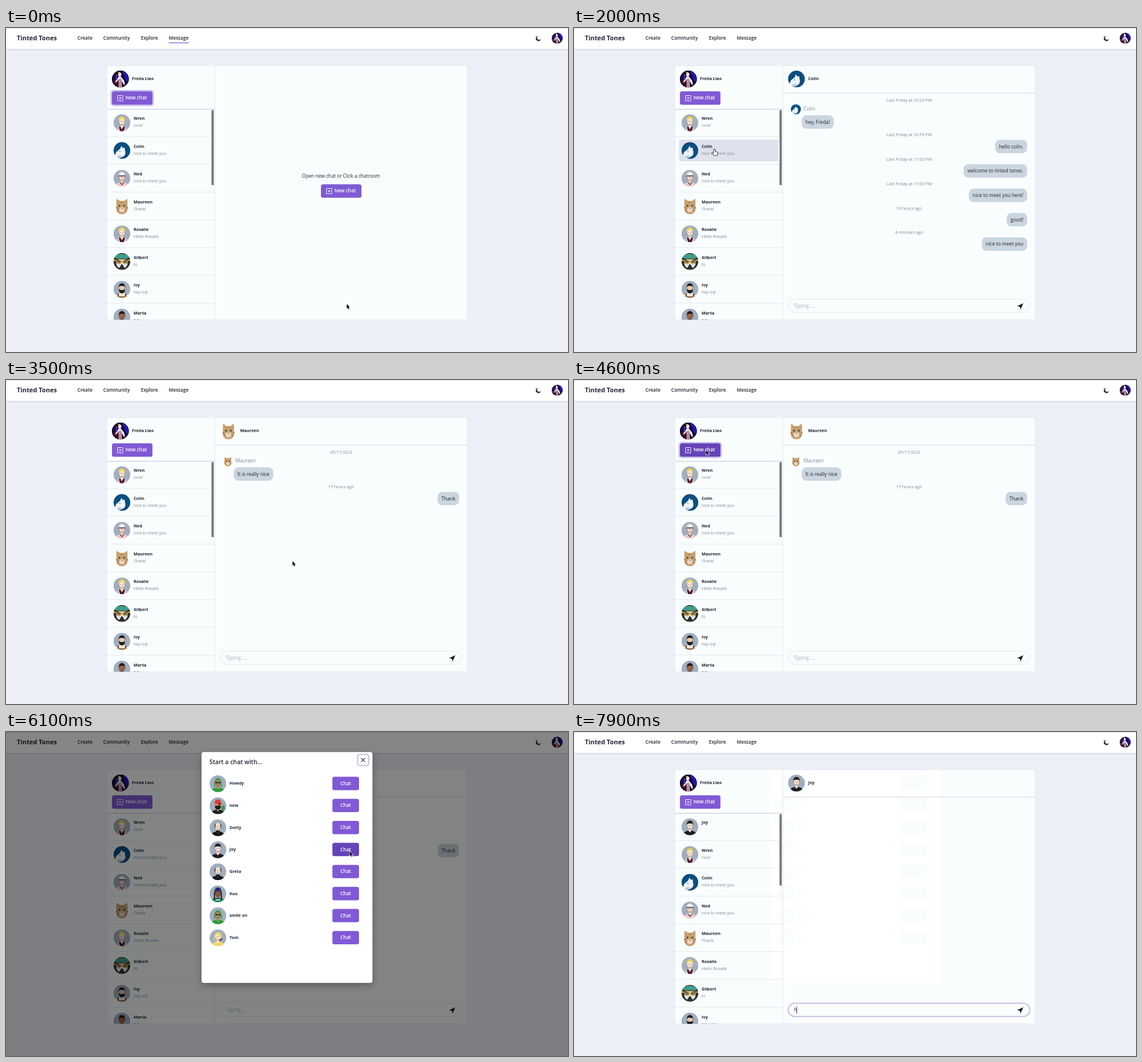
Recreate the animation shown at these times as an HTML page with a canvas. Size 960 by 554 pixels, loop 8000 ms.

```html
<!DOCTYPE html>
<html lang="en">
<head>
<meta charset="utf-8">
<title>Chat rooms</title>
<style>
  html, body { margin: 0; width: 100%; height: 100%; overflow: hidden; background: #edf2f7; }
  canvas { display: block; }
</style>
</head>
<body>
<canvas id="stage" width="960" height="554"></canvas>
<script>
const c = document.getElementById('stage').getContext('2d');
const LOOP = 8000, ROW = 47.45, MODAL_ROW = 37.65;
const INK = '#1f2633', MUTED = '#7b879b', LINE = '#e2e8ef', SURFACE = '#f9fdfd';
const PURPLE = '#805ad5', DEEP = '#6643b8', RING = '#cbbdec', SLATE = '#a0aec0', BUBBLE = '#cbd5e0';

// ---- avatars: lists of [fill, path] in a disc of radius 14.4 ----
const oval = (x, y, rx, ry = rx) =>
  `M${x - rx} ${y}a${rx} ${ry} 0 1 0 ${2 * rx} 0a${rx} ${ry} 0 1 0 ${-2 * rx} 0z`;
const disc = oval(0, 0, 14.4);
const shades = 'M-4.5-3h4v2.4h-3.4zM.5-3h4l-.6 2.4H.5z';
const person = (skin, top, hair, hairPath, ...extra) => [
  [SLATE, disc],
  [top, 'M-11.5 15C-11 8-6.5 7.5 0 6C6.5 7.5 11 8 11.5 15z'],
  [skin, 'M-2.4 2h4.8v5l-2.4 2.8-2.4-2.8z'],
  ['#3a3336', oval(0, -2.2, 5.3, 6.9)],
  [skin, oval(0, -2.2, 5, 6.6)],
  [hair, hairPath],
  ['#2a2426', oval(-1.9, -2, .5) + oval(1.9, -2, .5) + 'M-1.3 1.9h2.6v.5h-2.6z'],
  ...extra
];
const cropped = 'M-5.4-2C-6.8-13 6.8-13 5.4-2L4.3-5.5h-8.6z';
const hood = person('#c08a5e', '#2f9e3c', '#2f9e3c',
  'M-6.5 7C-9-15 9-15 6.5 7L4.4 2V-5.5h-8.8V2z', ['#222', shades]);
const bald = person('#f0dcc6', '#16161a', '#2b2b2e',
  'M-5.6 0v-5l1.6-2-.5 7zM5.6 0v-5l-1.6-2 .5 7z', ['#16161a', 'M-3 4.8h6v4h-6z']);

const faces = {
  me: [
    ['#170a2c', disc], ['#2415b8', 'M3-15h12V8L9 2z'], ['#3a1030', 'M-14 3l9-6 2 18h-9z'],
    ['#eee6f0', oval(-1, -7.5, 2.8, 3.6) + 'M-3-4h4l5 6 2 7-2 1-4-7v3h-5V1l-4 5-2-1z'],
    ['#b98a9e', 'M-3 0h5l1 15h-6z'], ['#e8d44a', oval(-2, -10.5, 1.6)], ['#3a2bd0', 'M-8-8h3v9h-3z']
  ],
  blond: person('#f8e0cc', '#f1eef0', '#ecd351',
    'M-5.6-2C-8-14 8-14 5.6-2L4.2-6-3-7.5z',
    ['#5a1d33', 'M-5.5 8L-3 6 0 11l3-5 2.5 2L3 15h-6z'],
    [SLATE, 'M-12 15l4.5-8 2.8 8zM12 15l-4.5-8-2.8 8z']),
  dog: [
    ['#0b4f80', disc],
    ['#eef3f7', 'M-12 6C-9 1-5-1-3-3L-1-8 2-4 5-5 5-1C7 4 6 9 1 11L-6 14-12 10z'],
    ['#bcc9d6', 'M-5 8l6 1-6 5-4-2z'], ['#26303a', oval(-11, 5.6, .9) + oval(-3.4, 1.6, .8)]
  ],
  cap: person('#f7d3bd', '#f6c9c4', '#f5f3f2',
    'M-5.6-4C-6.2-13 6.2-13 5.6-4z',
    ['#403946', 'M-6-5h12v1.5H-6z'], ['#2f3a5a', 'M-3 6.6L0 10l3-3.4.8 1L0 12l-3.8-4.4z']),
  cat: [
    ['#c9a071', 'M-9.5 0L-9.5-13-3.5-8.5h7l6-4.5L9.5 0C11.5 9 6 14.4 0 14.4S-11.5 9-9.5 0z'],
    ['#8e6842', 'M-2-8h1l.4 5zM1-8h1l-1.4 5zM-10 2l4 1-4 1zM10 2L6 3l4 1zM-8 7l3 0-2 2zM8 7L5 7l2 2z'],
    ['#eadbc6', oval(0, 6.5, 4.6, 4)], ['#3c4a38', oval(-4.2, -.5, 1.6) + oval(4.2, -.5, 1.6)],
    ['#9c5c4c', 'M-1.5 4h3L0 5.8z']
  ],
  cool: [
    ['#2d3030', disc], ['#3f9c8c', 'M-13-7C-9-15 9-15 13-7L9-5H-9z'],
    ['#e4e2dc', oval(0, 4, 9.5, 8)], ['#2d3030', 'M-1 5h2l4 7H-5z'],
    ['#e0b73a', oval(-5, 0, 5, 4.3) + oval(5, 0, 5, 4.3) + 'M-14-3h28v2h-28z'],
    ['#756d63', oval(-5, .2, 3.4, 2.8) + oval(5, .2, 3.4, 2.8)]
  ],
  beard: person('#f0cdb0', '#f1efec', '#1d1b1c',
    cropped + 'M-5.2-1L-3 1.2h6l2.2-2.2C6 9.5-6 9.5-5.2-1z',
    ['#8a5a34', 'M-8 15V8l3-1v5h10V7l3 1v7z']),
  dark: person('#9a6545', '#3b4453', '#201b1b', cropped),
  beanie: person('#f5dcc9', '#1c1d24', '#24211f', 'M-5.6-3C-6.8-13 6.8-13 5.6-3L4.2-5.4h-8.4z'),
  hood, bald,
  pirate: person('#e3a070', '#23222a', '#d6402f',
    'M-5.7-4C-6.2-13 6.2-13 5.7-4l3 2-3 0z',
    ['#1f1a1a', 'M-5 0h10C6 9-6 9-5 0zM.6-3.4h3v2.6h-3z'], ['#3d9a48', oval(9, 4, 3, 4.5)]),
  braids: person('#8c5b41', '#12885c', '#22306f',
    'M-5.8-4C-6.2-13 6.2-13 5.8-4z',
    ['#241c1c', 'M-6.5-4h2l-.5 14h-2zM6.5-4h-2l.5 14h2z'], ['#e8e8e8', 'M-4 10h8v1.4h-8z']),
  yellow: person('#f7e3c8', '#ecd869', '#f0d648',
    'M-6 9C-10-15 9-16 6.5 5L4.3-4-2-7-4.4-3z', ['#3a3a40', 'M2 4l5-3 1 1.4L3.4 6z'])
};

function avatar(face, x, y, r = 14.4) {
  c.save();
  c.translate(x, y);
  c.scale(r / 14.4, r / 14.4);
  c.clip(new Path2D(disc));
  for (const [fill, d] of faces[face]) { c.fillStyle = fill; c.fill(new Path2D(d)); }
  c.restore();
}

// ---- content ----
const contacts = [
  ['Wren', 'nice!', 'blond'], ['Colin', 'nice to meet you', 'dog'], ['Ned', 'nice to meet you', 'cap'],
  ['Maureen', 'Thank', 'cat'], ['Rosalie', 'Hello Rosalie', 'blond'], ['Gilbert', 'hi', 'cool'],
  ['Ivy', 'hey ivy!', 'beard'], ['Marta', 'hey', 'dark']
];
const people = [
  ['Howdy', 'hood'], ['new', 'pirate'], ['Dotty', 'bald'], ['Joy', 'beanie'],
  ['Greta', 'bald'], ['Kuo', 'braids'], ['smile on', 'hood'], ['Tom', 'yellow']
];
const chats = {
  colin: {
    name: 'Colin', face: 'dog', date: 'Last Friday at 10:20 PM', first: 'hey, Freda!',
    replies: [['Last Friday at 10:59 PM', 'hello colin.'], ['Last Friday at 11:00 PM', 'welcome to tinted tones.'],
      ['Last Friday at 11:00 PM', 'nice to meet you here!'], ['16 hours ago', 'good!'],
      ['8 minutes ago', 'nice to meet you']]
  },
  maureen: {
    name: 'Maureen', face: 'cat', date: '05/17/2022', first: 'It is really nice',
    replies: [['15 hours ago', 'Thank']]
  },
  joy: { name: 'Joy', face: 'beanie', replies: [] }
};

// ---- pointer: [time, x, y] ----
const track = [
  [0, 582, 472], [150, 582, 472], [850, 240, 122], [1100, 222, 92], [1250, 226, 108], [1400, 244.5, 134],
  [1750, 240, 208], [2100, 240, 208], [2320, 244, 302], [2400, 244, 298], [2500, 243, 250],
  [2750, 243, 302], [3150, 246, 304], [3550, 500, 310], [3950, 420, 210], [4400, 226, 120],
  [4600, 225.5, 120], [4800, 229, 117.5], [5000, 232, 118], [5800, 582, 203], [6100, 587, 204],
  [6700, 587, 204], [7050, 432, 116], [7400, 480, 425], [7550, 470, 475], [8000, 470, 475]
];
const ease = k => k * k * (3 - 2 * k);
const ramp = (t, a, b) => ease(t <= a ? 0 : t >= b ? 1 : (t - a) / (b - a));
function pointer(t) {
  const i = track.findIndex(k => k[0] > t);
  if (i < 1) return track[0].slice(1);
  const [a, ax, ay] = track[i - 1], [b, bx, by] = track[i], k = ramp(t, a, b);
  return [ax + (bx - ax) * k, ay + (by - ay) * k];
}
const inside = ([px, py], x, y, w, h) => px >= x && px < x + w && py >= y && py < y + h;

// ---- drawing helpers ----
function text(s, x, y, { size = 7.2, color = INK, weight = 400, align = 'left', family = '"Open Sans"' } = {}) {
  c.font = `${weight} ${size}px ${family}, sans-serif`;
  c.fillStyle = color;
  c.textAlign = align;
  c.fillText(s, x, y + size * .34);
}
function box(x, y, w, h, fill, r = 0, stroke, width = 1) {
  c.beginPath();
  c.roundRect(x, y, w, h, r);
  if (fill) { c.fillStyle = fill; c.fill(); }
  if (stroke) { c.strokeStyle = stroke; c.lineWidth = width; c.stroke(); }
}
function lines(d, color, width = 1) {
  c.strokeStyle = color;
  c.lineWidth = width;
  c.stroke(new Path2D(d));
}
function shape(d, x, y, fill, stroke, width) {
  c.save();
  c.translate(x, y);
  if (stroke) lines(d, stroke, width);
  c.fillStyle = fill;
  c.fill(new Path2D(d));
  c.restore();
}
function newChat(x, y, hover, focus) {
  if (focus) box(x - 1.2, y - 1.2, 71.6, 25.4, null, 4, RING, 2.2);
  box(x, y, 69.2, 23, hover ? DEEP : PURPLE, 3.5);
  lines(`M${x + 9.5} ${y + 7.2}h9v9h-9zM${x + 14} ${y + 9.4}v4.6M${x + 11.7} ${y + 11.7}h4.6`, '#fff', .9);
  text('New chat', x + 23, y + 11.3, { size: 8.1, weight: 600, color: '#fff' });
}
function bubble(s, x, y, fromRight) {
  c.font = '400 8.3px "Open Sans", sans-serif';
  const w = c.measureText(s).width + 13, left = fromRight ? x - w : x;
  box(left, y - 11.5, w, 23, BUBBLE, 8);
  text(s, left + 6.5, y, { size: 8.3 });
}

// ---- parts ----
function topBar(active) {
  box(0, 36, 960, 1.2, '#cfd3d9');
  box(0, 0, 960, 36, '#fff');
  box(0, 0, 960, 1, '#dcdfe3');
  text('Tinted Tones', 18.5, 17.3, { size: 10.8, weight: 700 });
  [['Create', 122], ['Community', 166], ['Explore', 230.5], ['Message', 278]].forEach(([s, x]) =>
    text(s, x, 17.3, { size: 8.1, weight: 600 }));
  if (active) box(278, 24.8, 34.5, 1.3, PURPLE);
  shape('M-1-4.4A4.4 4.4 0 1 0 4.4 1.4A3.8 3.8 0 0 1-1-4.4z', 909.3, 18, '#1a202c', '#1a202c', .5);
  avatar('me', 941.5, 17.5, 9.4);
}

function sidebar(list, hover, focus, modal) {
  avatar('me', 195.3, 87.2, 14.6);
  text('Freda Liao', 215.3, 87, { weight: 700 });
  newChat(181, 108.3, !modal && inside(hover, 181, 108, 69, 23), focus);
  c.save();
  c.beginPath();
  c.rect(172, 139, 184, 360);
  c.clip();
  list.forEach(([name, note, face], i) => {
    const y = 162 + ROW * i;
    if (!modal && inside(hover, 172, y - 22, 178, ROW) && hover[1] > 140)
      box(179.5, y - 18.4, 169.5, 37, '#dfe2ec', 3);
    avatar(face, 198, y);
    text(name, 218, y - 7, { weight: 700 });
    text(note, 218, y + 5, { color: MUTED });
    lines(`M172 ${y + 23.7}h184`, LINE);
  });
  c.restore();
  lines('M172 139h184.5', '#d3dae4', 1.6);
  box(351, 140, 4, list.length > 8 ? 123 : 129, '#7c7e80', 2);
}

function room(chat, t) {
  avatar(chat.face, 380, 87.2);
  text(chat.name, 400, 87, { weight: 700 });
  lines('M357 111.3h431', '#d8dfe8', 1.3);
  const date = (s, y) => text(s, 572.5, y, { color: MUTED, align: 'center' });
  if (chat.first) {
    date(chat.date, 124);
    avatar(chat.face, 379, 139, 8.8);
    text(chat.name, 392, 138.5, { size: 8.3, color: MUTED });
    bubble(chat.first, 389, 160.8);
  }
  chat.replies.forEach(([when, s], i) => {
    date(when, 183 + 41.7 * i);
    bubble(s, 774, 202.7 + 41.7 * i, true);
  });
  const focused = t >= 7550, typed = t >= 7850;
  box(366, 463.8, 412.5, 22.7, null, 11.3, focused ? RING : LINE, focused ? 2 : 1);
  if (typed) text('h', 376, 475.2, { size: 8.3 });
  else text('Typing.....', 375.5, 475.2, { size: 8.3, color: '#a3adbd' });
  if (focused) box(typed ? 380.2 : 375.2, 469, .8, 13, INK);
  shape('M5-4.6L-4.4-.2 0 .6 .8 4.8z', 762, 475.8, '#15181f', '#15181f', .6);
}

const chatButton = (y, fill) => box(557.5, y - 11.4, 45.5, 22.8, fill, 3.5);

function dialog(hover, k, scale) {
  c.save();
  c.globalAlpha = k;
  box(0, 0, 960, 554, 'rgba(0,0,0,.48)');
  c.translate(480, 231.5);
  c.scale(scale, scale);
  c.translate(-480, -231.5);
  c.shadowColor = 'rgba(0,0,0,.3)';
  c.shadowBlur = 12;
  c.shadowOffsetY = 4;
  box(334, 34.3, 292, 394.7, '#fff', 4);
  c.shadowColor = 'transparent';
  text('Start a chat with...', 347.5, 51.3, { size: 10.3, weight: 600 });
  box(600.5, 38.3, 19.2, 19.2, '#fff', 4, '#c6bfdf', 2);
  lines('M606.6 44.4l7 7m0-7l-7 7', INK, 1.1);
  people.forEach(([name, face], i) => {
    const y = 88 + MODAL_ROW * i;
    avatar(face, 362, y + .3);
    text(name, 381.8, y, { weight: 700 });
    chatButton(y, inside(hover, 557.5, y - 11.4, 45.5, 22.8) ? DEEP : PURPLE);
    text('Chat', 580.2, y, { size: 8.1, weight: 600, color: '#fff', align: 'center' });
  });
  c.restore();
}

// Pale imprint the dialog leaves on the panel
function imprint() {
  box(334.5, 65, 290.5, 363.5, '#fff');
  people.forEach(([name], i) => {
    const y = 88 + MODAL_ROW * i;
    box(347.6, y - 14.1, 28.8, 28.8, SURFACE, 14.4);
    text(name, 381.8, y, { weight: 700, color: SURFACE });
    chatButton(y, SURFACE);
  });
}

function statusBar() {
  box(-4, 542, 255.5, 16, '#a6a8ac', 2);
  text('https://tuneful-hall-db.example/user/kQvhzLT4BNWGtsoYe7RHPD63uXJ5', 3, 548,
    { color: '#f2f3f4', family: 'Roboto' });
}

function drawPointer(pos, chat, modal) {
  const [x, y] = pos;
  if (!modal && inside(pos, 172, 140, 178, 359))
    shape('M-1 0c0-1.1 1.7-1.1 1.7 0v3.3l3.4.9c1 .3 1.2 1 1 2l-.8 3.6h-5l-3-3.7c-.6-.9.6-1.5 1.3-.8l1.4 1z',
      x, y, '#fff', '#111', 1.6);
  else if (chat && !modal && inside(pos, 366, 464, 385, 23))
    lines(`M${x - 2} ${y - 5}h4m-2 0v10m-2 0h4`, '#111', .8);
  else
    shape('M0 0v7.8l1.8-1.5 1.3 2.9 1.3-.5-1.3-2.9h2.4z', x, y, '#0a0a0a', '#fff', 1.2);
}

function draw(t) {
  const pos = pointer(t), hover = pointer(t > 100 ? t - 100 : 0); // hover styles trail the pointer
  const chat = t < 1950 ? null : t < 2850 ? chats.colin : t < 6400 ? chats.maureen : chats.joy;
  const opening = ramp(t, 4650, 4800), closing = ramp(t, 6400, 6500), modal = opening > 0 && closing < 1;
  const list = chat === chats.joy ? [['Joy', '', 'beanie'], ...contacts] : contacts;

  box(0, 0, 960, 554, '#edf1f7');
  topBar(!chat);
  box(172, 64.5, 616, 434.5, SURFACE, 3, LINE);
  if (closing === 1) imprint();
  lines('M356.5 64.5v434.5', LINE);
  sidebar(list, hover, t < 1950 || (t >= 4500 && t < 4700), modal);
  if (chat) room(chat, t);
  else {
    text('Open new chat or Click a chatroom', 572.3, 253.2, { size: 8.2, align: 'center' });
    newChat(538, 267.2, inside(hover, 538, 267, 69, 23));
  }
  if (modal) dialog(hover, opening * (1 - closing), .95 + .05 * (opening - closing));
  if (t >= 1050 && t < 1700) statusBar();
  if (t < 7850) drawPointer(pos, chat, modal);
}

function tick() {
  draw(performance.now() % LOOP);
  requestAnimationFrame(tick);
}
tick();
</script>
</body>
</html>
```
